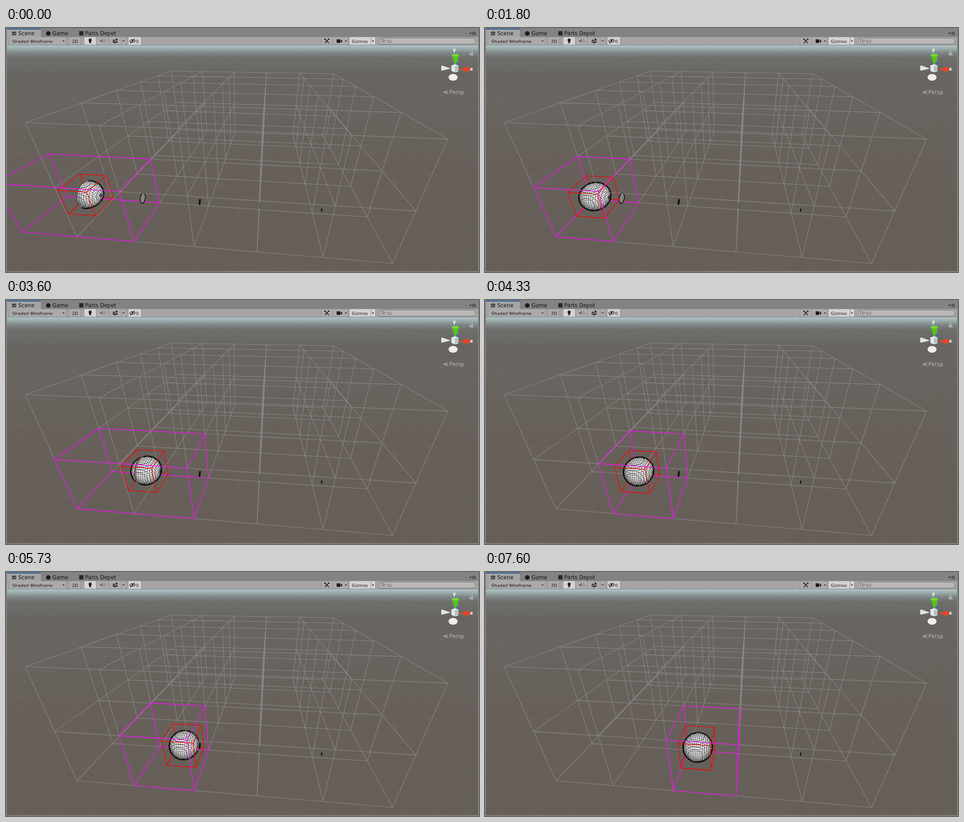
An HTML page that plays this animation: 1040 by 539 pixels, repeating every 7670 ms.

```html
<!DOCTYPE html>
<html lang="en">
<head>
<meta charset="utf-8">
<title>Sphere crossing grid cells</title>
<style>
  html, body { margin: 0; width: 100%; height: 100%; overflow: hidden; background: #838383; }
  svg { display: block; width: 100%; height: 100%; }
  text { font-family: "DejaVu Sans", sans-serif; fill: #161616; }
  .tab { font-size: 11.7px; }
  .bar { font-size: 9.5px; }
  .line { fill: none; stroke-width: 1.15; }
  .grey { stroke: #878786; }
  .magenta { stroke: #f0f; stroke-width: 1.3; }
  .red { stroke: #f00; stroke-width: 1.3; }
</style>
</head>
<body>
<svg viewBox="0 0 1040 539" preserveAspectRatio="none">
  <defs>
    <linearGradient id="sky" gradientUnits="userSpaceOnUse" x1="0" y1="38" x2="0" y2="539">
      <stop offset="0" stop-color="#b0c4c5"/>
      <stop offset=".016" stop-color="#9aabab"/>
      <stop offset=".034" stop-color="#7d8584"/>
      <stop offset=".056" stop-color="#6d6e6b"/>
      <stop offset=".13" stop-color="#686561"/>
      <stop offset=".5" stop-color="#67605a"/>
      <stop offset="1" stop-color="#665f58"/>
    </linearGradient>
    <radialGradient id="lit" cx=".5" cy=".42" r=".62">
      <stop offset="0" stop-color="#fff"/>
      <stop offset=".6" stop-color="#eee"/>
      <stop offset="1" stop-color="#888"/>
    </radialGradient>
    <clipPath id="view"><rect x="2" y="38" width="1036" height="499"/></clipPath>
  </defs>

  <rect width="1040" height="539" fill="#838383"/>
  <rect x="2" y="38" width="1036" height="499" fill="url(#sky)"/>

  <g clip-path="url(#view)">
    <path id="ground" class="line" stroke="#8a8480" stroke-opacity=".15" style="stroke-width:1"/>
    <path id="gridBack" class="line grey"/>
    <path id="cellBack" class="line magenta"/>
    <path id="boxBack" class="line red"/>
    <path id="faces" fill="url(#lit)"/>
    <path id="wires" class="line" stroke="#000" stroke-opacity=".66" style="stroke-width:.9"/>
    <path id="rim" fill="#000" fill-opacity=".85"/>
    <path id="cap" fill="#000" fill-opacity=".6"/>
    <path id="disc" fill="#e4e4e4" stroke="#000" stroke-width="1.4"/>
    <path id="discWires" class="line" stroke="#000" stroke-opacity=".75" style="stroke-width:.9"/>
    <path id="slivers" fill="#111" stroke="#111" stroke-width=".8"/>
    <path id="gridFront" class="line grey"/>
    <path id="boxFront" class="line red"/>
    <path id="cellFront" class="line magenta"/>
  </g>

  <!-- tabs -->
  <rect x="2" y="2" width="75" height="18" fill="#a5a5a5"/>
  <rect x="2" y="1.5" width="75" height="2" fill="#2f5f9e"/>
  <path d="M15.5 7V17M19.5 7V17M12.5 10H23M12.5 14H23" stroke="#222" stroke-width="1.3"/>
  <text class="tab" x="27" y="16">Scene</text>
  <circle cx="93" cy="12" r="5" fill="#1c1c1c"/>
  <text class="tab" x="102" y="16">Game</text>
  <rect x="161" y="7" width="9.5" height="9.5" fill="#2a2a2a"/>
  <text class="tab" x="174" y="16">Parts Depot</text>
  <path d="M1018.500 10.500H1024L1021.200 13.500Z" fill="#222"/>
  <path d="M1025 9.500H1033M1025 12H1033M1025 14.500H1033" stroke="#222" stroke-width="1.2"/>

  <!-- toolbar -->
  <rect x="2" y="20" width="1036" height="18" fill="#a5a5a5"/>
  <path d="M2 37.500H1038" stroke="#7c7c7c"/>
  <g fill="#ababab">
    <rect x="7" y="20" width="125" height="17"/><rect x="139" y="20" width="25" height="17"/>
    <rect x="199" y="20" width="25" height="17"/><rect x="226" y="20" width="37" height="17"/>
    <rect x="693" y="20" width="25" height="17"/><rect x="719" y="20" width="33" height="17"/>
  </g>
  <g fill="#d2d2d2">
    <rect x="172" y="20" width="26" height="17"/><rect x="269" y="20" width="28" height="17"/>
    <rect x="755" y="20" width="57" height="17"/>
  </g>
  <path d="M6.500 20V37M132.500 20V37M138.500 20V37M164.500 20V37M171.500 20V37M198.500 20V37M225.500 20V37M253.500 20V37M263.500 20V37M268.500 20V37M297.500 20V37M692.500 20V37M718.500 20V37M752.500 20V37M754.500 20V37M802.500 20V37M812.500 20V37" stroke="#8b8b8b"/>
  <path d="M124 27.500h5l-2.500 3zM256 27.500h5l-2.500 3zM745 27.500h5l-2.500 3zM804.500 27.500h5l-2.500 3z" fill="#333"/>
  <text class="bar" x="14" y="32.500">Shaded Wireframe</text>
  <text class="bar" x="145" y="32.500">2D</text>
  <path d="M185 23a4 4 0 0 1 2 7v3.500h-4V30a4 4 0 0 1 2-7z" fill="#1d1d1d"/>
  <path d="M206.500 27h2.500l3.500-3v9l-3.500-3h-2.500z" fill="#6d6d6d"/>
  <path d="M214.500 25.500q2 3 0 6M217 24q3 4.500 0 9" fill="none" stroke="#777"/>
  <path d="M234 29l6 2.500 6-2.500v2l-6 3-6-3zM234 27l4-1.500 2 3 5-1-5 2.500zM243 22l1 2.500 2.500 1-2.500 1-1 2.500-1-2.500-2.500-1 2.500-1z" fill="#1d1d1d"/>
  <path d="M271.500 29q6-7.500 13 0-7 6.500-13 0M273 34L283 23.500" fill="none" stroke="#222" stroke-width="1.2"/>
  <circle cx="278" cy="28.500" r="2" fill="#222"/>
  <text class="bar" x="286" y="32.500">0</text>
  <path d="M701 24L710 33.500M710 24L701 33.500" stroke="#1d1d1d" stroke-width="1.8"/>
  <path d="M699.500 26l3-3M708.500 23l3 3" stroke="#1d1d1d" stroke-width="1.6"/>
  <path d="M727 25h8v8h-8zM735.500 28l3.500-2.500v7l-3.500-2.500z" fill="#222"/>
  <text class="bar" x="760.500" y="32.500">Gizmos</text>
  <rect x="820.500" y="22.500" width="212" height="13" rx="6.500" fill="#b9b9b9" stroke="#777"/>
  <circle cx="828" cy="28" r="2.700" fill="none" stroke="#555"/>
  <path d="M830 30l2.500 3" stroke="#555"/>
  <path d="M832 27.500h4l-2 2.500z" fill="#555"/>
  <text class="bar" x="837.500" y="32.500" style="fill:#666">All</text>

  <!-- orientation gizmo -->
  <path d="M987.500 74l6 1.500 1 6-6 3z" fill="#2a5be8"/>
  <text x="989" y="75" font-size="10" style="fill:#dfe6f5">z</text>
  <path d="M980 60.500L987 81h2.500L996 60.500z" fill="#53c41c"/>
  <ellipse cx="988" cy="60" rx="8" ry="3" fill="#6fdd35"/>
  <path d="M958 82.500L978 89.500 958 94.500q-2.500-6 0-12z" fill="#e3e3e3"/>
  <path d="M998 91L1017 85.500q5 5 0 11.500z" fill="#f2421f"/>
  <path d="M979 83l8-3 8 2.500v13l-7.500 2.500-8-3z" fill="#e6e6e6"/>
  <path d="M987 85l8-2.500v13l-4-1-4 3.500z" fill="#bdbdbd"/>
  <ellipse cx="983" cy="109" rx="10" ry="7.500" fill="#ededed"/>
  <g font-weight="bold" font-size="10.500">
    <text x="982.500" y="52" style="fill:#fff">y</text>
    <text x="1020" y="94" style="fill:#fff">x</text>
  </g>
  <path d="M972.500 138L962.500 142 972.500 146M963 142H972.500" fill="none" stroke="#b8b6b3" stroke-width="1.2"/>
  <text x="975" y="146" font-size="11.800" style="fill:#bcbab7">Persp</text>
  <rect x="1019.500" y="54.500" width="8" height="6" fill="#aab0ae"/>
  <path d="M1021 54.500v-2q2.500-3 5 0v2" fill="none" stroke="#aab0ae" stroke-width="1.3"/>
</svg>

<script>
const LOOP = 7670, R = 0.25, MID = 0.5, STEP = 1 / 32, TAU = Math.PI * 2;
const EYE = [3.03, 2.98, -2.53];
// Sphere centre after every twelfth move, starting with move 2
const KEYS = [.024, .263, .52, .754, 1.002, 1.263, 1.52, 1.753, 1.993, 2.267, 2.507];

const put = (id, d) => document.getElementById(id).setAttribute('d', d);

function project([x, y, z]) {
  const w = 1 - .0228 * x - .119 * y + .228 * z;
  return [(156 + 119.4 * x - 61.9 * y + 131.9 * z) / w,
          (461 - .05 * x - 150.8 * y + 4.3 * z) / w];
}
const at = p => project(p).map(v => v.toFixed(1)).join(' ');
const seg = (a, b) => `M${at(a)}L${at(b)}`;
const poly = pts => 'M' + pts.map(at).join('L') + 'Z';

// Wire box; edges meeting the farthest corner go to "back"
function wireBox(lo, hi) {
  let back = '', front = '';
  for (let axis = 0; axis < 3; axis++) {
    for (let i = 0; i < 4; i++) {
      const a = [0, 0, 0], [j, k] = [0, 1, 2].filter(n => n !== axis);
      a[j] = i & 1 ? hi[j] : lo[j];
      a[k] = i & 2 ? hi[k] : lo[k];
      const b = a.slice();
      a[axis] = lo[axis];
      b[axis] = hi[axis];
      const far = [lo[0], lo[1], hi[2]];
      if (a[j] === far[j] && a[k] === far[k]) back += seg(a, b);
      else front += seg(a, b);
    }
  }
  return { back, front };
}

function drawGrid() {
  const size = [5, 2, 5];
  let back = '', front = '';
  for (let x = 0; x <= 5; x++) for (let y = 0; y <= 2; y++) for (let z = 0; z <= 5; z++) {
    const a = [x, y, z];
    for (let axis = 0; axis < 3; axis++) {
      if (a[axis] === size[axis]) continue;
      const b = a.slice();
      b[axis]++;
      if (z === 0 && (axis < 2 || y > 0)) front += seg(a, b);
      else back += seg(a, b);
    }
  }
  put('gridBack', back);
  put('gridFront', front);
}

function drawGround() {
  let d = '';
  for (let i = -40; i <= 40; i++) {
    const x = 3.12 + i / 2;
    d += seg([x, 0, -.9], [x, 0, i % 10 ? 10 : 60]);
  }
  for (let z = -.75; z < 50; z += z < 9 ? .5 : 5) d += seg([-22, 0, z], [24, 0, z]);
  put('ground', d);
}

// How directly a point on the sphere faces the viewer, -1 to 1
function facing(p, cx) {
  const n = [p[0] - cx, p[1] - MID, p[2] - MID], v = EYE.map((e, i) => e - p[i]);
  return (n[0] * v[0] + n[1] * v[1] + n[2] * v[2]) / (Math.hypot(...n) * Math.hypot(...v) || 1);
}

// Slabs of 1/64: nothing left of the grid, and a seam at each cell border
const solid = slab => slab >= 0 && !(slab >= 32 && (slab + 2) % 64 < 3);

function ringPoint(axis, centre, offset, angle) {
  const r = Math.sqrt(Math.max(0, R * R - offset * offset));
  const p = centre.slice();
  p[axis] += offset;
  p[(axis + 1) % 3] += r * Math.cos(angle);
  p[(axis + 2) % 3] += r * Math.sin(angle);
  return p;
}

function drawSphere(cx) {
  const c = [cx, MID, MID];
  let faces = '', rim = '', wires = '';
  const clamp = x => Math.max(-R, Math.min(R, x - cx));

  for (let s = Math.floor((cx - R) * 64); s < (cx + R) * 64; s++) {
    if (!solid(s)) continue;
    const o0 = clamp(s / 64), o1 = clamp((s + 1) / 64), n = 40;
    for (let i = 0; i < n; i++) {
      const a = i / n * TAU, b = (i + 1.1) / n * TAU;
      const f = facing(ringPoint(0, c, (o0 + o1) / 2, (a + b) / 2), cx);
      if (f < 0) continue;
      const quad = poly([ringPoint(0, c, o0, a), ringPoint(0, c, o1, a),
                         ringPoint(0, c, o1, b), ringPoint(0, c, o0, b)]);
      faces += quad;
      if (f < .34) rim += quad;
    }
  }

  for (let axis = 0; axis < 3; axis++) {
    const first = Math.ceil((c[axis] - R) / STEP);
    for (let k = first; k * STEP < c[axis] + R; k++) {
      const o = k * STEP - c[axis], n = 48;
      for (let i = 0; i < n; i++) {
        const p = ringPoint(axis, c, o, i / n * TAU), q = ringPoint(axis, c, o, (i + 1) / n * TAU);
        if (facing(p, cx) > 0 && solid(Math.floor((p[0] + q[0]) * 32))) wires += seg(p, q);
      }
    }
  }
  put('faces', faces);
  put('rim', rim);
  put('wires', wires);
  put('cap', solid(Math.floor((cx + R) * 64)) ? discPath(cx + R, .035) : '');
}

function discPath(x, r) {
  return poly(Array.from({ length: 20 }, (_, i) =>
    [x, MID + r * Math.cos(i / 20 * TAU), MID + r * Math.sin(i / 20 * TAU)]));
}

// Flat remnants wait at each cell border until the sphere reaches them
function drawDiscs(first) {
  let wires = '', slivers = '';
  const r = .088;
  if (first <= 1) {
    for (let o = -2; o <= 2; o++) {
      const v = o * STEP, h = Math.sqrt(r * r - v * v);
      wires += seg([1, MID + v, MID - h], [1, MID + v, MID + h]);
      wires += seg([1, MID - h, MID + v], [1, MID + h, MID + v]);
    }
  }
  [.052, .04, .028].forEach((size, i) => {
    if (i + 2 >= first) slivers += discPath(i + 2, size);
  });
  put('disc', first <= 1 ? discPath(1, r) : '');
  put('discWires', wires);
  put('slivers', slivers);
}

function centreAt(move) {
  const i = Math.max(0, Math.min(KEYS.length - 2, Math.floor((move - 2) / 12)));
  return KEYS[i] + (KEYS[i + 1] - KEYS[i]) * (move - 2 - 12 * i) / 12;
}

let shown = -1;
function render(ms) {
  const tick = Math.floor((ms % LOOP + 4) * .015);
  const move = tick < 3 ? tick : tick - 1; // one stall near the start
  if (move === shown) return;
  shown = move;
  const x = centreAt(move), left = Math.floor(x - R), right = Math.ceil(x + R);
  const box = wireBox([x - R, MID - R, MID - R], [x + R, MID + R, MID + R]);
  const cell = wireBox([left, 0, 0], [right, 1, 1]);
  put('boxBack', box.back);
  put('boxFront', box.front);
  put('cellBack', cell.back);
  put('cellFront', cell.front);
  drawSphere(x);
  drawDiscs(right);
}

drawGround();
drawGrid();
const start = performance.now();
function loop() {
  render(performance.now() - start);
  requestAnimationFrame(loop);
}
loop();
</script>
</body>
</html>
```
